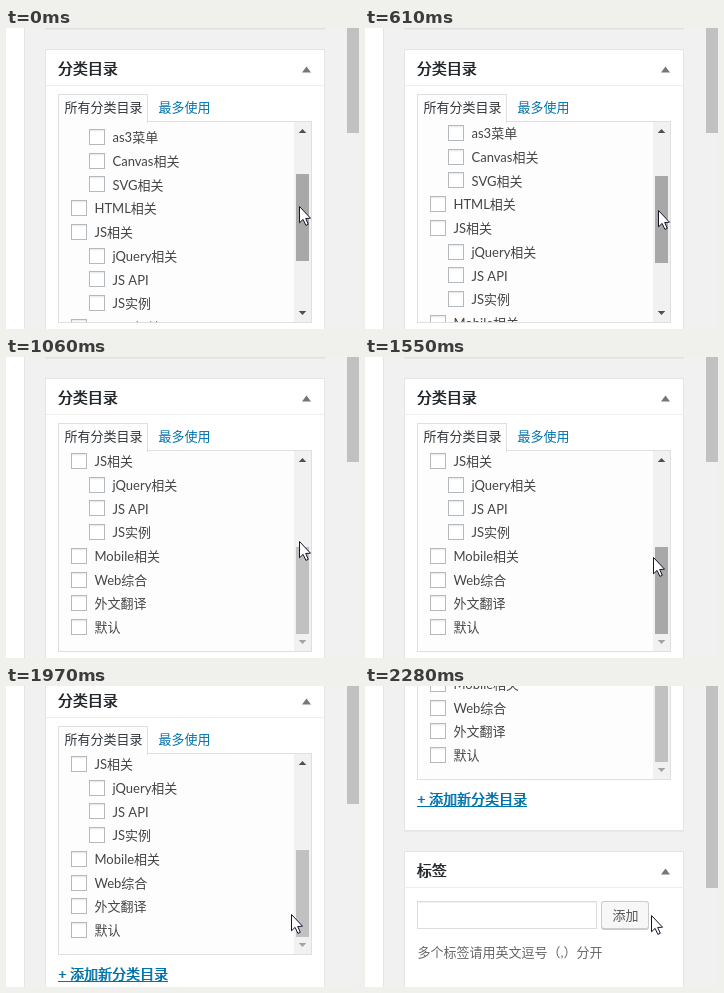
Write an HTML page with a canvas that moves like this. It is 353 px wide and 301 px high and loops after 4.07 s.

```html
<!DOCTYPE html>
<html lang="zh-CN">
<head>
<meta charset="utf-8">
<style>
html, body { margin: 0; width: 100%; height: 100%; overflow: hidden; background: #f1f1f1; }
canvas { display: block; }
</style>
</head>
<body>
<canvas id="stage" width="353" height="301"></canvas>
<script>
const ctx = document.getElementById('stage').getContext('2d');
const LOOP = 4070;
const FONT = 'Lato, "Noto Sans CJK SC", "Noto Sans CJK", sans-serif';
const IDLE = '#c1c1c1', HOVER = '#a8a8a8', PRESSED = '#787878';
const BLUE = '#0073aa';

// Held poses: start time, list scroll, page scroll, cursor x, cursor y, thumb colour
const poses = [
  [0, 81, 0, 293, 178, HOVER],
  [100, 81, 0, 293, 178, PRESSED],
  [310, 81, 0, 293, 178, HOVER],
  [470, 82, 0, 293, 180, HOVER],
  [550, 85, 0, 293, 182, HOVER],
  [620, 91, 0, 293, 182, HOVER],
  [690, 103, 0, 293, 182, HOVER],
  [770, 121, 0, 293, 182, HOVER],
  [850, 159, 0, 293, 182, HOVER],
  [930, 181, 0, 293, 182, HOVER],
  [1060, 181, 0, 293, 184, IDLE],
  [1550, 181, 0, 288, 200, HOVER],
  [1610, 181, 0, 285, 226, IDLE],
  [1770, 181, 1, 285, 228, IDLE],
  [1830, 181, 5, 285, 228, IDLE],
  [1970, 181, 26, 285, 228, IDLE],
  [2020, 181, 60, 285, 228, IDLE],
  [2110, 181, 124, 286, 229, IDLE],
  [2190, 181, 178, 286, 229, IDLE],
  [2280, 181, 201, 286, 229, IDLE]
];

// Category rows: label, nesting level
const rows = [
  ['as3菜单', 1], ['Canvas相关', 1], ['SVG相关', 1], ['HTML相关', 0],
  ['JS相关', 0], ['jQuery相关', 1], ['JS API', 1], ['JS实例', 1],
  ['Mobile相关', 0], ['Web综合', 0], ['外文翻译', 0], ['默认', 0]
];

function rect(x, y, w, h, color) {
  ctx.fillStyle = color;
  ctx.fillRect(x, y, w, h);
}

function box(x, y, w, h, border, fill) {
  rect(x, y, w, h, border);
  rect(x + 1, y + 1, w - 2, h - 2, fill);
}

function text(str, x, mid, color, size = 13) {
  ctx.font = `${size}px ${FONT}`;
  ctx.fillStyle = color;
  ctx.fillText(str, x, mid + Math.round(size * 0.38));
}

// Bold made by widening the regular strokes sideways
function boldText(str, x, mid, color, size) {
  text(str, x - 0.5, mid, color, size);
  text(str, x + 0.3, mid, color, size);
}

function poly(points, color) {
  ctx.fillStyle = color;
  ctx.beginPath();
  points.forEach(([x, y]) => ctx.lineTo(x, y));
  ctx.closePath();
  ctx.fill();
}

// dir: -1 points up, 1 points down
function arrow(x, y, half, height, dir, color) {
  const d = dir * height / 2;
  poly([[x - half, y - d], [x + half, y - d], [x, y + d]], color);
}

function panel(y, h, title) {
  rect(39, y + h, 280, 1, '#e8e8e8');
  box(39, y, 280, h, '#e5e5e5', '#fff');
  rect(40, y + 36, 278, 1, '#eee');
  boldText(title, 52, y + 19, '#23282d', 15);
  arrow(300.5, y + 20.5, 4.5, 6, -1, '#72777c');
}

function checkbox(x, y) {
  box(x, y, 16, 16, '#b4b9be', '#fff');
  rect(x + 1, y + 1, 14, 1, '#ececec');
  rect(x + 1, y + 2, 14, 1, '#f8f8f8');
}

function list(scroll, thumb) {
  box(52, 93, 254, 202, '#dfdfdf', '#fdfdfd');
  ctx.save();
  ctx.beginPath();
  ctx.rect(53, 94, 252, 200);
  ctx.clip();
  rows.forEach(([label, level], i) => {
    const mid = 109 + i * 23.73 + 81 - scroll;
    checkbox(65 + level * 18, Math.round(mid) - 8);
    text(label, 88.5 + level * 18, Math.round(mid + 0.15), '#444');
  });
  rect(288, 94, 17, 200, '#f1f1f1');
  rect(290, 111 + Math.floor(scroll * 79 / 181), 13, 87, thumb);
  arrow(296.5, 103, 3.8, 4, -1, '#505050');
  arrow(296.5, 285, 3.8, 4, 1, scroll >= 181 ? '#a3a3a3' : '#505050');
  ctx.restore();
}

function categories(scroll, thumb) {
  panel(21, 325, '分类目录');
  list(scroll, thumb);
  box(52, 66, 90, 29, '#dfdfdf', '#fdfdfd');
  rect(53, 93, 88, 2, '#fdfdfd');
  text('所有分类目录', 58.5, 79, '#32373c');
  text('最多使用', 152.5, 79, BLUE);
  boldText('+ 添加新分类目录', 52.5, 314, BLUE, 14);
  rect(52, 321, 110, 1, BLUE);
}

function tags() {
  panel(366, 200, '标签');
  box(52, 416, 180, 28, '#ddd', '#fff');
  rect(53, 417, 178, 1, '#f2f2f2');
  ctx.fillStyle = '#ccc';
  ctx.beginPath();
  ctx.roundRect(236, 416, 48, 29, 3);
  ctx.fill();
  ctx.fillStyle = '#f7f7f7';
  ctx.beginPath();
  ctx.roundRect(237, 417, 46, 26, 2);
  ctx.fill();
  text('添加', 247.5, 430, '#555');
  text('多个标签请用英文逗号（,）分开', 52.5, 467, '#666');
}

function cursor(x, y) {
  const shape = [[0.5, 0.5], [0.5, 16.8], [4.1, 13.4], [6.9, 19.4], [9.3, 18.3], [6.7, 12.5], [11.5, 12.2]]
    .map(([px, py]) => [x + px, y + py]);
  poly(shape, '#fff');
  ctx.strokeStyle = '#14142c';
  ctx.lineWidth = 1;
  ctx.stroke();
}

function draw(t) {
  const [, scroll, page, cx, cy, thumb] = poses.findLast(p => p[0] <= t);
  rect(0, 0, 353, 301, '#f1f1f1');
  rect(0, 0, 18, 301, '#fff');
  rect(18, 0, 1, 301, '#e5e5e5');
  ctx.save();
  ctx.translate(0, -page);
  rect(39, 0, 280, 1, '#e0e0e0');
  rect(39, 1, 280, 1, '#e8e8e8');
  categories(scroll, thumb);
  tags();
  ctx.restore();
  rect(341, 0, 12, Math.round(105 + page * 0.485), IDLE);
  cursor(cx, cy);
}

function tick() {
  draw(performance.now() % LOOP);
  requestAnimationFrame(tick);
}
tick();
</script>
</body>
</html>
```
